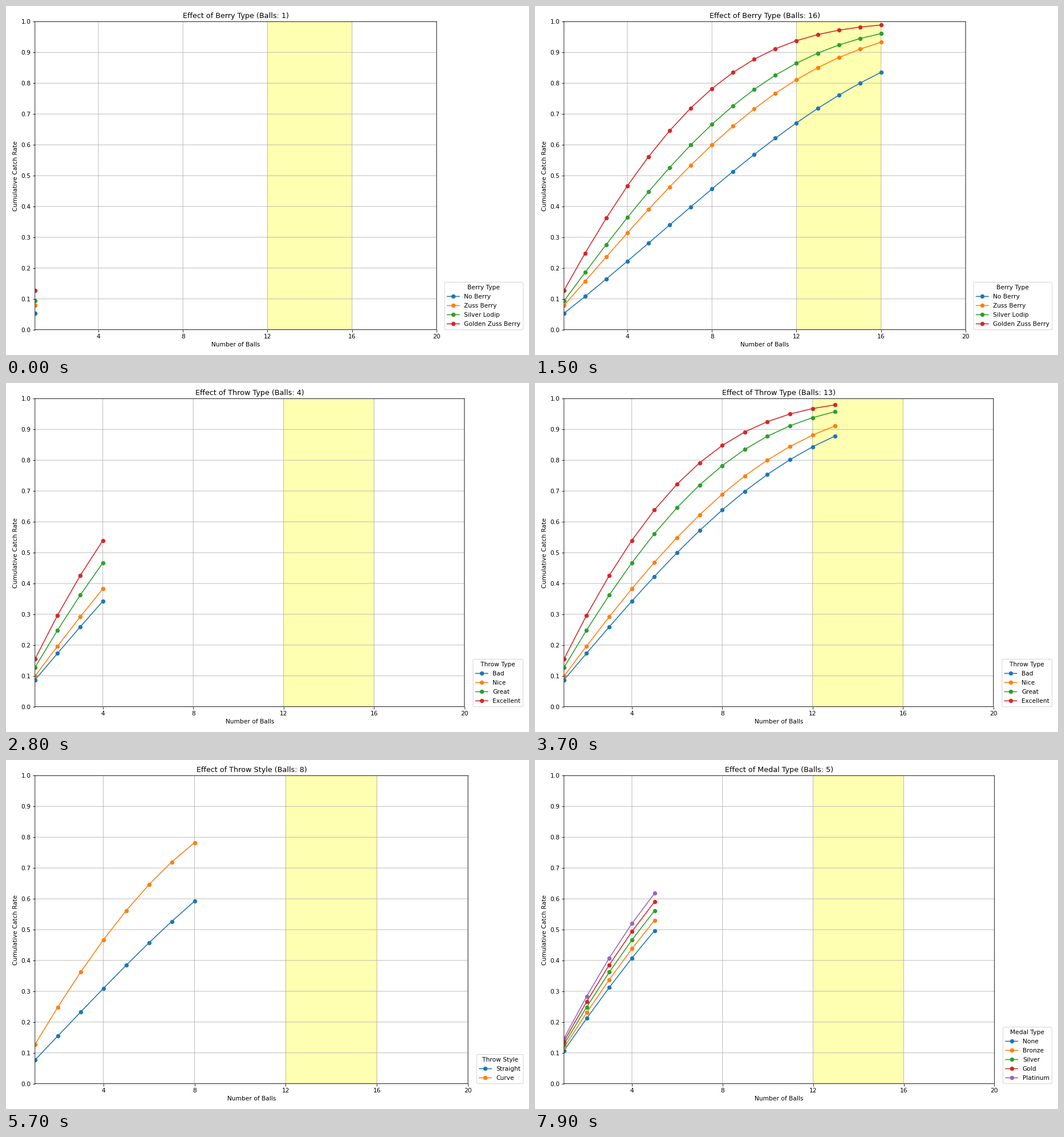
A matplotlib script that plays this animation: 917 px wide and 611 px high, repeating every 8 s.

```python
import numpy as np
import matplotlib.pyplot as plt
from matplotlib.animation import FuncAnimation

W, H, DPI = 917, 611, 76.375
LEFT, TOP, BOTTOM = 50.8, 27.3, 566.7
BALLS, HOLD, FRAMES = 20, 5, 80

# Smooth sub-pixel placement of lines and markers
plt.rcParams["path.snap"] = False

# Bonus multipliers
BERRY = {"No Berry": 1, "Zuss Berry": 1.5, "Silver Lodip": 1.8,
         "Golden Zuss Berry": 2.5}
THROW = {"Bad": 1, "Nice": 1.15, "Great": 1.5, "Excellent": 1.85}
STYLE = {"Straight": 1, "Curve": 1.7}
MEDAL = {"None": 1, "Bronze": 1.1, "Silver": 1.2, "Gold": 1.3, "Platinum": 1.4}

# heading, options, product of the other bonuses, right edge in pixels
CHARTS = [
    ("Berry Type", BERRY, 1.5 * 1.7 * 1.2, 755.0),
    ("Throw Type", THROW, 2.5 * 1.7 * 1.2, 803.8),
    ("Throw Style", STYLE, 2.5 * 1.5 * 1.2, 810.1),
    ("Medal Type", MEDAL, 2.5 * 1.5 * 1.7, 805.4),
]

balls = np.arange(1, BALLS + 1)
step = balls - 1
# Each further ball is more likely to succeed
hazard = np.cumsum(0.01781 * np.exp(0.0932 * step - 0.000595 * step**2))


def catch_rate(bonus):
    return 1 - np.exp(-hazard * bonus)


fig = plt.figure(figsize=(12.0066, 8), dpi=DPI, facecolor="white")


def make_chart(kind, options, others, right):
    ax = fig.add_axes([LEFT / W, 1 - BOTTOM / H,
                       (right - LEFT) / W, (BOTTOM - TOP) / H])
    ax.axvspan(12, 16, color="yellow", alpha=0.3)
    curves = []
    for name, bonus in options.items():
        line, = ax.plot([], [], marker="o", label=name)
        curves.append((line, catch_rate(bonus * others)))
    ax.set(xlim=(1, BALLS), ylim=(0, 1),
           xticks=range(4, BALLS + 1, 4), yticks=np.linspace(0, 1, 11),
           xlabel="Number of Balls", ylabel="Cumulative Catch Rate")
    ax.grid(True)
    ax.legend(title=kind, loc="lower left", bbox_to_anchor=(1.02, 0),
              borderaxespad=0, labelspacing=0.565, borderpad=0.43)
    return ax, kind, curves


charts = [make_chart(*chart) for chart in CHARTS]


def update(frame):
    current, tick = divmod(frame, BALLS + HOLD)
    count = min(tick + 1, BALLS)
    for i, (ax, kind, curves) in enumerate(charts):
        ax.set_visible(i == current)
        if i == current:
            ax.set_title(f"Effect of {kind} (Balls: {count})")
            for line, rates in curves:
                line.set_data(balls[:count], rates[:count])
    return []


anim = FuncAnimation(fig, update, frames=FRAMES, interval=100,
                     init_func=lambda: update(0), repeat=True, repeat_delay=0)
plt.show()
```
